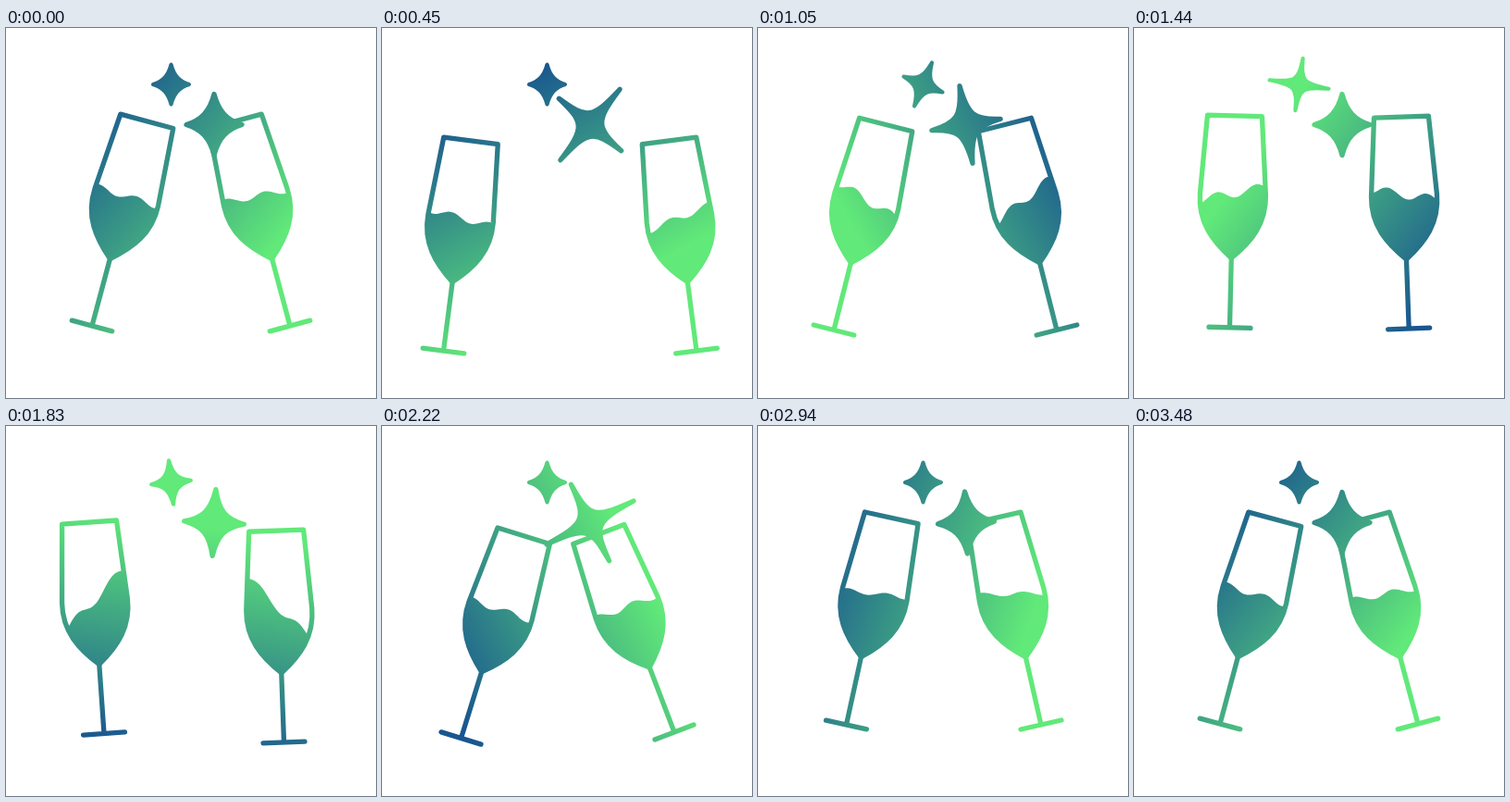
An HTML page with a canvas that plays this animation: 400x400 px, repeating every 5660 ms.

```html
<!DOCTYPE html>
<html lang="en">
<head>
<meta charset="utf-8">
<title>Cheers</title>
<style>
html, body { margin: 0; width: 100%; height: 100%; overflow: hidden; background: #fff; }
canvas { display: block; width: 100vw; height: 100vh; }
</style>
</head>
<body>
<canvas id="stage" width="400" height="400"></canvas>
<script>
const ctx = document.getElementById('stage').getContext('2d');
const LOOP = 5660, MOVE = 3480, STEP = 30;
const RAD = Math.PI / 180;

// Rows are [time, values...]; returns a smooth monotone interpolation of all values.
function track(keys) {
  const last = keys.length - 1;
  const slope = (i, c) => (keys[i + 1][c] - keys[i][c]) / (keys[i + 1][0] - keys[i][0]);
  const tangent = (i, c) => {
    if (i === 0 || i === last) return 0;
    const a = slope(i - 1, c), b = slope(i, c);
    return a * b > 0 ? 2 * a * b / (a + b) : 0;
  };
  return t => {
    let i = 0;
    while (i < last - 1 && t >= keys[i + 1][0]) i++;
    const h = keys[i + 1][0] - keys[i][0];
    const s = Math.min(1, Math.max(0, (t - keys[i][0]) / h));
    return keys[i].slice(1).map((v, n) => {
      const c = n + 1, s2 = s * s, s3 = s2 * s;
      return v * (2 * s3 - 3 * s2 + 1) + keys[i + 1][c] * (3 * s2 - 2 * s3) +
        h * (tangent(i, c) * (s3 - 2 * s2 + s) + tangent(i + 1, c) * (s3 - s2));
    });
  };
}

// foot x, foot y, lean in degrees
const leftPose = track([
  [0, 93, 322, 15], [450, 66.5, 349, 7.4], [570, 65.5, 351, 6.6],
  [1050, 82, 326.5, 14.2], [1170, 91, 323, 15.5], [1620, 107, 325, -6.3],
  [1830, 106, 332.5, -4], [2070, 94, 340, 8], [2220, 85.5, 337.5, 17.2],
  [2940, 95.5, 323, 12.3], [3480, 93, 322, 15]
]);
const rightPose = track([
  [0, 307, 322, -15], [450, 340, 349, -7.4], [570, 341.5, 351, -6.6],
  [1050, 323, 326.5, -14.2], [1170, 312, 323, -16], [1620, 293, 328, 5.5],
  [1830, 300.5, 342, -2.1], [2070, 309, 339, -13], [2220, 316, 331, -20.9],
  [2940, 306, 323, -12.8], [3480, 307, 322, -15]
]);
// left tilt, right tilt, wave height, wave phase
const liquid = track([
  [0, 2.6, 4, 3.3, 0], [450, 7.6, -15.5, 3.5, 3.1], [1050, 17.5, -24.6, 4.5, 3.8],
  [1830, -43, 46.6, 5, 4.7], [2220, 2, 0, 3.3, 6.6], [2940, -5, 11, 2.3, 6],
  [3480, 2.6, 4, 3.3, 6.28]
]);
// turn in degrees, stretch
const bigSpin = track([
  [0, 0, 0], [450, 40, 1], [600, 80, 1.25], [1050, 170.5, .55], [1350, 180, 0],
  [1740, 180, 0], [1830, 183, .17], [2220, 243.5, 1.15], [2340, 270, 1.25],
  [2940, 357.5, .03], [3480, 360, 0]
]);
const smallSpin = track([
  [0, 0, 0], [600, 0, 0], [1050, 22, .35], [1400, 90, 1], [1830, 174, .22], [2220, 180, 0]
]);
const gradientTurn = track([
  [0, 40], [450, 62], [1050, 151], [1830, 280], [2220, 333], [2940, 379], [3480, 400]
]);

function gradient(deg) {
  const x = Math.cos(deg * RAD), y = Math.sin(deg * RAD);
  const g = ctx.createLinearGradient(200 - 155 * x, 200 - 155 * y, 200 + 92 * x, 200 + 92 * y);
  g.addColorStop(0, '#19568f');
  g.addColorStop(1, '#61e979');
  return g;
}

function bowlPath() {
  ctx.beginPath();
  ctx.moveTo(-29.5, -229);
  ctx.lineTo(29.5, -229);
  ctx.lineTo(35.5, -144);
  ctx.bezierCurveTo(37, -113, 21, -93, 0, -75);
  ctx.bezierCurveTo(-21, -93, -37, -113, -35.5, -144);
  ctx.closePath();
}

function drawGlass([x, y, lean], tilt, height, phase) {
  ctx.save();
  ctx.translate(x, y);
  ctx.rotate(lean * RAD);
  ctx.lineWidth = 5.3;

  bowlPath();
  ctx.stroke();
  ctx.save();
  ctx.clip();
  ctx.beginPath();
  ctx.moveTo(-40, -70);
  for (let v = -40; v <= 40; v += 2) {
    const wave = height * Math.sin(v * Math.PI / 21 + phase);
    ctx.lineTo(v, -145 + v * Math.tan(tilt * RAD) - wave);
  }
  ctx.lineTo(40, -70);
  ctx.fill();
  ctx.restore();

  ctx.beginPath();
  ctx.moveTo(0, -75);
  ctx.lineTo(0, 0);
  ctx.moveTo(-22.5, 0);
  ctx.lineTo(22.5, 0);
  ctx.stroke();
  ctx.restore();
}

function drawStar(x, y, scale, [turn, stretch]) {
  const a = (33 + 17 * stretch) * scale, b = (30 + 14 * stretch) * scale;
  const p = (5 - 2.5 * stretch) * scale, q = (14 - 8 * stretch) * scale;
  const cos = Math.cos(turn * RAD), sin = Math.sin(turn * RAD);
  // Points are turned by hand so the gradient stays fixed to the stage.
  const at = (u, v) => [x + u * cos - v * sin, y + u * sin + v * cos];
  const curve = (...pts) => ctx.bezierCurveTo(...pts.flatMap(k => at(...k)));
  ctx.beginPath();
  ctx.moveTo(...at(0, -a));
  curve([p, -q], [q, -p], [b, 0]);
  curve([q, p], [p, q], [0, a]);
  curve([-p, q], [-q, p], [-b, 0]);
  curve([-q, -p], [-p, -q], [0, -a]);
  ctx.closePath();
  ctx.lineWidth = 2 + 3.3 * scale;
  ctx.fill();
  ctx.stroke();
}

// Glasses are drawn as a mask, then tinted in stage coordinates.
function draw(t) {
  const [tiltL, tiltR, height, phase] = liquid(t);
  ctx.globalCompositeOperation = 'source-over';
  ctx.clearRect(0, 0, 400, 400);
  ctx.lineJoin = ctx.lineCap = 'round';
  ctx.fillStyle = ctx.strokeStyle = '#000';
  drawGlass(leftPose(t), tiltL, height, phase);
  drawGlass(rightPose(t), tiltR, height, phase);
  drawStar(178.5, 61, .65, smallSpin(t));
  drawStar(225, 104.5, 1, bigSpin(t));
  ctx.globalCompositeOperation = 'source-in';
  ctx.fillStyle = gradient(gradientTurn(t)[0]);
  ctx.fillRect(0, 0, 400, 400);
}

const start = performance.now();
function tick() {
  const t = (performance.now() - start) % LOOP;
  draw(Math.min(MOVE, Math.floor(t / STEP) * STEP));
  requestAnimationFrame(tick);
}
tick();
</script>
</body>
</html>
```
